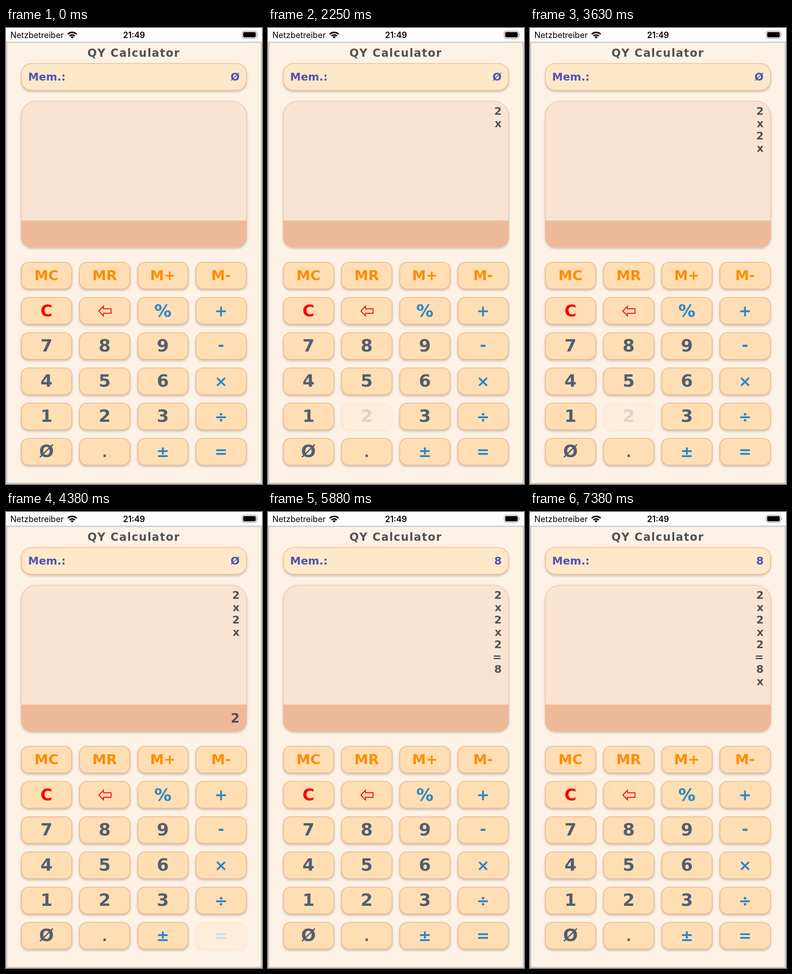
An HTML page for the animation above (8 s loop, 561 by 998 pixels).

```html
<!DOCTYPE html>
<html lang="de">
<head>
<meta charset="utf-8">
<title>Calculator</title>
<style>
  html, body { margin: 0; width: 100%; height: 100%; overflow: hidden; background: #fff; }
  svg { display: block; width: 100%; height: 100%; }
  text { font-family: "DejaVu Sans", Verdana, sans-serif; font-weight: 700; }
  .status { font-family: Inter, sans-serif; font-size: 18px; font-weight: 400; }
  .clock { font-weight: 600; }
  .shadow { filter: drop-shadow(0 3px 2.5px rgba(70, 45, 30, .26)); }
  .mid { text-anchor: middle; }
  .end { text-anchor: end; }
</style>
</head>
<body>
<svg id="stage" viewBox="0 0 561 998" xmlns="http://www.w3.org/2000/svg">
  <rect width="561" height="998" fill="#fefefe"/>
  <rect x="1.5" y="31.2" width="558" height="965.3" fill="#fef2e6" stroke="#d0cfcf" stroke-width="3"/>

  <text class="status" x="9.5" y="21.6">Netzbetreiber</text>
  <text class="status clock mid" x="280.5" y="21.8">21:49</text>
  <g fill="none" stroke="#000">
    <path d="M135.3 13.7A13.8 13.8 0 0 1 154.7 13.7" stroke-width="3.3"/>
    <path d="M139.1 17.5A8.4 8.4 0 0 1 150.9 17.5" stroke-width="3.1"/>
  </g>
  <path d="M145 23L141.5 19.6A5 5 0 0 1 148.5 19.6Z"/>
  <rect x="517.5" y="6.8" width="32" height="16" rx="5" fill="none" stroke="#999" stroke-width="1.3"/>
  <rect x="519.7" y="9" width="27.6" height="11.6" rx="3"/>
  <path d="M551 12.2Q553.4 14.8 551 17.4Z" fill="#999"/>

  <text class="mid" x="280" y="63" font-size="24" letter-spacing="1.5" fill="#525252">QY Calculator</text>

  <rect class="shadow" x="33.7" y="77.8" width="493.5" height="58.4" rx="22" fill="#fde9c8" stroke="#efbc94" stroke-width="1.5"/>
  <g font-size="23.5" fill="#5450b8">
    <text x="48.5" y="115">Mem.:</text>
    <text class="end" x="512" y="115" id="memory"></text>
  </g>

  <g class="shadow">
    <path d="M33.7 422V192A32 32 0 0 1 65.7 160.2H495.2A32 32 0 0 1 527.2 192V422Z" fill="#f9e4d4" stroke="#f3c4a2" stroke-width="1.4"/>
    <path d="M33 421.7H527.9V457A23 23 0 0 1 504.9 480H56A23 23 0 0 1 33 457Z" fill="#eeb999"/>
  </g>
  <g id="history" class="end" font-size="23.5" fill="#525252"></g>
  <text id="entry" class="end" x="512" y="460.5" font-size="28" fill="#525252"></text>
  <g id="keys"></g>
</svg>
<script>
const LOOP = 8000;
const TAPE = "2x2x2=8x";
const ORANGE = "#ff8c00", RED = "#f80000", BLUE = "#2986c8", SLATE = "#525f70";
const byId = id => document.getElementById(id);

function add(parent, tag, attrs, content) {
  const el = document.createElementNS("http://www.w3.org/2000/svg", tag);
  for (const name in attrs) el.setAttribute(name, attrs[name]);
  if (content) el.textContent = content;
  parent.appendChild(el);
  return el;
}

const rows = ["MC MR M+ M-", "C ⇦ % +", "7 8 9 -", "4 5 6 ×", "1 2 3 ÷", "Ø . ± ="];

// Size, baseline offset within the key and colour of a label
function labelStyle(label) {
  if (label[0] === "M") return [30.5, 39, ORANGE];
  if (label === "C") return [36, 41, RED];
  if (label === "%") return [37.5, 42, BLUE];
  if (label === "-") return [34, 38.5, BLUE];
  if ("+×÷±=".includes(label)) return [34, 41, BLUE];
  if (label === ".") return [29, 41, SLATE];
  return [38, 41, SLATE];
}

const keys = {};
rows.forEach((row, r) => row.split(" ").forEach((label, c) => {
  const x = 33.7 + c * 127.5, y = 512.7 + r * 77.1;
  const key = keys[label] = add(byId("keys"), "g", { transform: `translate(${x} ${y})` });
  add(key, "rect", { class: "shadow", width: 110.5, height: 58.4, rx: 16,
    fill: "#ffdeb3", stroke: "#ebb58e", "stroke-width": 1.5 });
  if (label === "⇦") {
    add(key, "path", { d: "M42.3 29.7L52.4 19V24.7H69V34.7H52.4V40.4Z",
      fill: "none", stroke: RED, "stroke-width": 1.9 });
    return;
  }
  const [size, dy, fill] = labelStyle(label);
  add(key, "text", { class: "mid", x: 55, y: dy, "font-size": size, fill }, label);
}));

const lines = [...TAPE].map((ch, i) =>
  add(byId("history"), "text", { x: 512, y: 189.5 + i * 27 }, ch));

// Each press: key, then time and opacity pairs that hold until the next
const press = (key, down, up) =>
  [key, [down, .2], [up, .35], [up + 120, .85], [up + 250, 1]];
const presses = [
  ["2", [750, .2], [1000, .7], [1130, 1]],
  ["×", [1250, .5], [1380, .2], [1630, .35], [1750, .85], [1880, 1]],
  press("2", 2250, 2380),
  press("×", 2880, 3130),
  press("2", 3630, 3750),
  press("=", 4380, 4630),
  press("M+", 5500, 5630),
  ["×", [6880, .5], [7000, .2], [7130, .35], [7250, .85], [7380, 1]]
];

// Time, tape length, entry, memory
const states = [
  [0, 0, "", "Ø"], [1000, 0, "2", "Ø"], [1630, 2, "", "Ø"],
  [2380, 2, "2", "Ø"], [3130, 4, "", "Ø"], [3750, 4, "2", "Ø"],
  [4630, 7, "", "Ø"], [5630, 7, "", "8"], [7130, 8, "", "8"]
];

const latest = (list, t) => list.filter(item => item[0] <= t).pop();

function render(t) {
  const [, count, entry, memory] = latest(states, t);
  lines.forEach((line, i) => line.setAttribute("visibility", i < count ? "visible" : "hidden"));
  byId("entry").textContent = entry;
  byId("memory").textContent = memory;

  const opacity = {};
  for (const [key, ...steps] of presses) {
    const step = latest(steps, t);
    opacity[key] = step ? step[1] : opacity[key] ?? 1;
  }
  for (const key in opacity) keys[key].setAttribute("opacity", opacity[key]);
}

const start = performance.now();
function tick() {
  render((performance.now() - start) % LOOP);
  requestAnimationFrame(tick);
}
tick();
</script>
</body>
</html>
```
